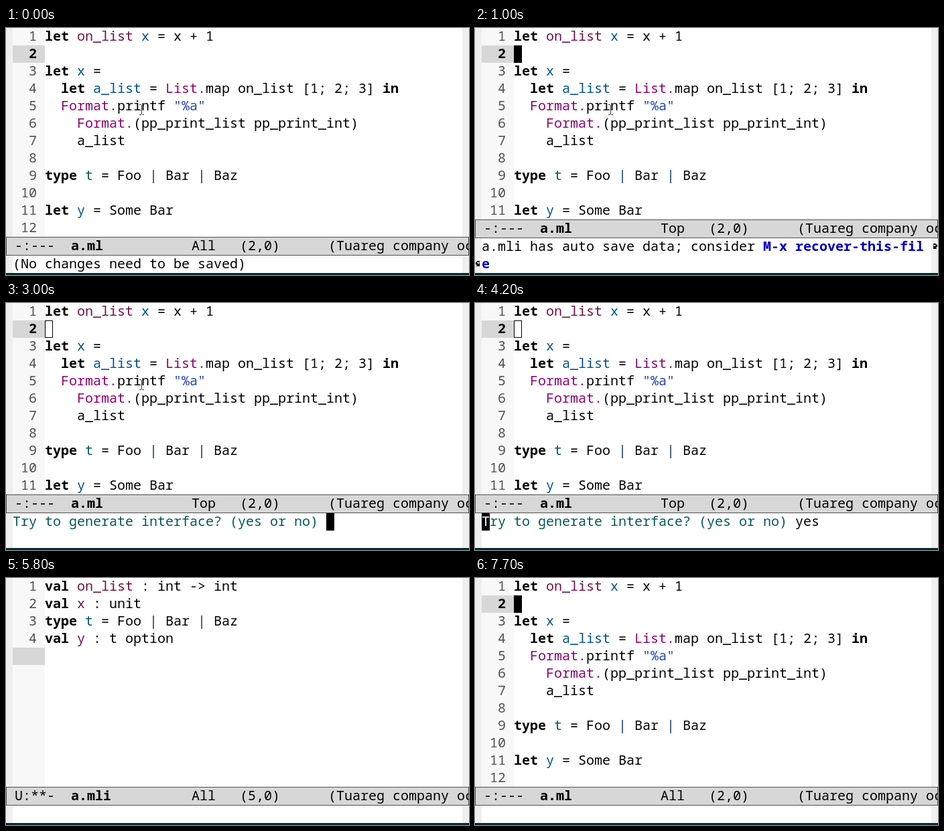
An HTML page that plays this animation: 691 px wide and 369 px high, repeating every 8 s.

```html
<!DOCTYPE html>
<html lang="en">
<head>
<meta charset="utf-8">
<title>Generating an interface in the editor</title>
<style>
  html, body { margin: 0; width: 100%; height: 100%; overflow: hidden; background: #fff; }
  body { position: relative; }
  div, pre, svg { position: absolute; margin: 0; box-sizing: border-box; }
  pre { font: 20px/26px "Noto Sans Mono", "DejaVu Sans Mono", monospace;
        font-variant-ligatures: none; color: #000; white-space: pre; }
  .fringe { top: 0; width: 10px; height: 366px; background: #efefef; }
  #gutter { left: 10px; top: 0; width: 48px; background: #f8f8f8; }
  #current { left: 10px; width: 48px; height: 26px; background: #d7d7d7; }
  #numbers { left: 10px; top: -1px; color: #505050; }
  #code { left: 58px; top: -1px; }
  #bar { left: 0; width: 691px; height: 28px; background: #d7d7d7;
         border: 1px solid #505050; overflow: hidden; }
  #mode { left: 0; top: -1px; }
  #echo { left: 10px; }
  #cursor { width: 12px; height: 26px; background: #000; }
  #under { left: 0; top: -1px; color: #fff; }
  #hollow { left: 58px; top: 26px; width: 12px; height: 26px; border: 1px solid #000; }
  #edge { left: 0; top: 366px; width: 691px; height: 3px; background: #002b36; }
  svg { left: 0; top: 0; }
  .k, .l, .n { font-weight: bold; }
  .l { color: #0000c0; }
  .n { color: #000; }
  .f { color: #721045; }
  .v { color: #00538b; }
  .t { color: #005a5f; }
  .m { color: #8f0075; }
  .s { color: #2544bb; }
  .c { color: #093060; }
</style>
</head>
<body>
<div class="fringe" style="left:0"></div>
<div class="fringe" style="left:681px"></div>
<div id="gutter"></div>
<div id="current"></div>
<pre id="numbers"></pre>
<pre id="code"></pre>
<div id="bar"><pre id="mode"></pre></div>
<pre id="echo"></pre>
<div id="hollow"></div>
<div id="cursor"><pre id="under"></pre></div>
<svg width="691" height="369">
  <defs><path id="curl" d="M2 0h4v2h-5v-1h1zM0 2h2v1h1v1h2v-1h1v5h-5v-1h1v-1h-1v-1h-1z"/></defs>
  <g id="wrap">
    <use href="#curl" transform="translate(1 348)"/>
    <use href="#curl" transform="translate(690 322) scale(-1 1)"/>
  </g>
  <path id="mouse" d="M199 114.5h2.5l1 1 1-1h2.5M202.5 115.5v13M199 129.5h2.5l1-1 1 1h2.5"
        fill="none" stroke="#333"/>
</svg>
<div id="edge"></div>
<script>
const $ = id => document.getElementById(id);
const LOOP = 8000, ROW = 26, CHAR = 12;

// x{text} marks text with style class x
const paint = text => text.replace(/(\w)\{(.*?)\}/g, '<span class="$1">$2</span>');

const ml = { name: 'a.ml', flags: '-:---', line: 2, count: 12, code:
`k{let} f{on_list} v{x} = x + 1

k{let} v{x} =
  k{let} v{a_list} = m{List.}map on_list [1; 2; 3] k{in}
  m{Format.}printf s{"%a"}
    m{Format.}(pp_print_list pp_print_int)
    a_list

k{type} t{t} = Foo c{|} Bar c{|} Baz

k{let} v{y} = Some Bar` };

const mli = { name: 'a.mli', flags: 'U:**-', line: 5, count: 4, code:
`k{val} f{on_list} : int -> int
k{val} f{x} : unit
k{type} t{t} = Foo c{|} Bar c{|} Baz
k{val} f{y} : t option` };

const saved = '(No changes need to be saved)';
const warning = 'a.mli has auto save data; consider l{M-x recover-this-fil}\nl{e}';
const question = 'Try to generate interface? (yes or no) ';

const blink = (t, start) => Math.floor((t - start) / 500) % 2 === 0;

function stateAt(t) {
  const warned = t >= 1000 && t < 4300, asking = t >= 2000 && t < 4300;
  const s = { file: t >= 4300 && t < 6700 ? mli : ml, rows: warned ? 11 : 12,
              echo: '', on: t >= 400, warned, asking };
  if (asking) {
    const typed = t < 3400 ? 0 : Math.min(3, Math.floor((t - 3300) / 100));
    const home = t >= 4200;
    s.echo = `t{${question}}${'yes'.slice(0, typed)}`;
    s.column = home ? 0 : question.length + typed;
    s.under = home ? 'T' : '';
    s.on = home || (t < 3400 ? blink(t, 2000) : t < 4100);
  } else if (t >= 4300) s.on = blink(t, t < 6700 ? 4300 : 6700);
  else if (t < 800) s.echo = saved;
  else if (warned) s.echo = warning;
  return s;
}

const show = (id, visible) => $(id).style.display = visible ? '' : 'none';

function place(id, x, y) {
  $(id).style.left = x + 'px';
  $(id).style.top = y + 'px';
}

function render(t) {
  const { file, rows, echo, on, warned, asking, column, under } = stateAt(t);
  const lineTop = (file.line - 1) * ROW, barTop = rows * ROW, echoTop = barTop + 28;

  $('gutter').style.height = barTop + 'px';
  place('current', 10, lineTop);
  $('numbers').innerHTML = Array.from({ length: Math.min(rows, file.count) }, (_, i) => {
    const label = String(i + 1).padStart(3);
    return i + 1 === file.line ? paint(`n{${label}}`) : label;
  }).join('\n');
  $('code').innerHTML = paint(file.code);

  place('bar', 0, barTop);
  $('mode').innerHTML = paint(` ${file.flags}  k{${file.name}}`) +
    ' '.repeat(15 - file.name.length) + (warned ? 'Top' : 'All') +
    `   (${file.line},0)      (Tuareg company oc`;

  place('echo', 10, echoTop - 1);
  $('echo').innerHTML = paint(echo);

  // The buffer's cursor is hollow while the prompt has focus
  if (asking) place('cursor', 10 + column * CHAR, echoTop);
  else place('cursor', 58, lineTop);
  $('under').textContent = under || '';
  show('cursor', on);
  show('hollow', asking);
  show('wrap', warned && !asking);
  show('mouse', t < 3400);
}

const start = performance.now();
function tick() {
  render((performance.now() - start) % LOOP);
  requestAnimationFrame(tick);
}
tick();
</script>
</body>
</html>
```
